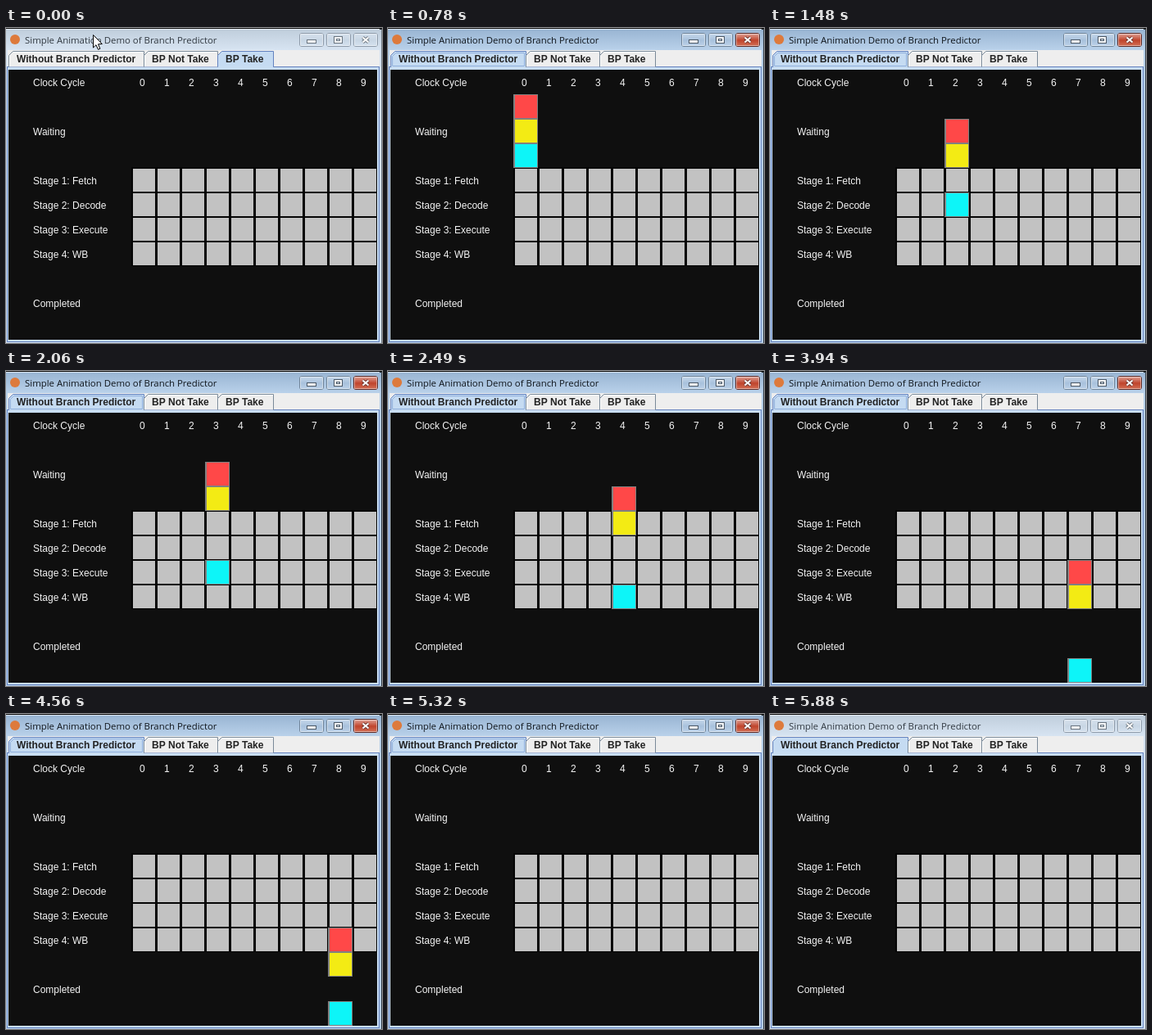
An HTML page with a canvas that plays this animation: 459 by 385 pixels, repeating every 5.98 s.

```html
<!DOCTYPE html>
<html lang="en">
<head>
<meta charset="utf-8">
<title>Branch Predictor Demo</title>
<style>
html, body { margin: 0; width: 100%; height: 100%; overflow: hidden; background: #000; }
canvas { display: block; }
</style>
</head>
<body>
<canvas id="stage" width="459" height="385"></canvas>
<script>
const ctx = document.getElementById('stage').getContext('2d');
const LOOP = 5980, CELL = 30, LEFT = 153, TOP = 81;
const SANS = '"Liberation Sans", Arial, sans-serif';

// Visible time span of each clock cycle, in ms
const CYCLES = [[510, 940], [1060, 1480], [1480, 1920], [2060, 2370], [2490, 2920],
  [3080, 3350], [3470, 3940], [3940, 4400], [4560, 4870], [5010, 5320]];
// Pointer: start time, x, y
const POINTER = [[0, 106, 8], [120, 104, 17], [240, 101, 27], [510, 99, 43], [660, 101, 43]];
const POINTER_END = 780;
const ACTIVE_FROM = 390, ACTIVE_TO = 5880;

const TABS = [['Without Branch Predictor', 3, 168], ['BP Not Take', 168, 258], ['BP Take', 258, 326]];
const LABELS = [['Clock Cycle', 71], ['Waiting', 131], ['Stage 1: Fetch', 191], ['Stage 2: Decode', 221],
  ['Stage 3: Execute', 251], ['Stage 4: WB', 281], ['Completed', 341]];

function rect(x, y, w, h, color) {
  ctx.fillStyle = color;
  ctx.fillRect(x, y, w, h);
}

function text(str, x, y, font, color) {
  ctx.font = font;
  ctx.fillStyle = color;
  ctx.fillText(str, x, y);
}

function fade(y0, y1, ...colors) {
  const g = ctx.createLinearGradient(0, y0, 0, y1);
  colors.forEach((c, i) => g.addColorStop(i / (colors.length - 1), c));
  return g;
}

function path(points, close) {
  ctx.beginPath();
  points.forEach(([x, y]) => ctx.lineTo(x, y));
  if (close) ctx.closePath();
}

function button(x, fill, edge) {
  ctx.beginPath();
  ctx.roundRect(x + 0.5, 6.5, 29, 16, 2.5);
  ctx.fillStyle = fill;
  ctx.fill();
  ctx.strokeStyle = edge;
  ctx.lineWidth = 1;
  ctx.stroke();
  ctx.strokeStyle = 'rgba(255,255,255,0.45)';
  ctx.strokeRect(x + 1.5, 7.5, 27, 14);
}

function cross(x, y, width, color) {
  ctx.beginPath();
  ctx.moveTo(x - 3.5, y - 3);
  ctx.lineTo(x + 3.5, y + 3);
  ctx.moveTo(x + 3.5, y - 3);
  ctx.lineTo(x - 3.5, y + 3);
  ctx.lineWidth = width;
  ctx.strokeStyle = color;
  ctx.stroke();
}

function titleBar(active) {
  const frame = active ? '#b9d1ea' : '#d7e4f2';
  rect(0, 0, 459, 385, frame);
  rect(0, 1, 459, 26, fade(1, 27, active ? '#98b4d2' : '#bfcddb', frame));
  rect(0, 0, 459, 1, '#101010');
  rect(0, 1, 457, 1, active ? '#dce8f4' : '#e8eff6');
  rect(458, 1, 1, 384, active ? '#3c4650' : '#7b858f');
  rect(456, 1, 3, 1, '#30363c');

  ctx.beginPath();
  ctx.arc(11, 14, 6, 0, Math.PI * 2);
  ctx.fillStyle = '#dd7a3c';
  ctx.fill();
  text('Simple Animation Demo of Branch Predictor', 23, 19,
    '11.4px "Open Sans", "Noto Sans", sans-serif', active ? '#10161c' : '#323a42');

  const face = active ? fade(7, 23, '#c5d7ea', '#a8c1dc', '#bed3ea')
    : fade(7, 23, '#d5e0ec', '#c8d6e4', '#d6e3f0');
  const edge = active ? '#6f8499' : '#8e9baa';
  const glyph = active ? '#4b5866' : '#69747f';
  button(358, face, edge);
  button(391, face, edge);
  button(424, active ? fade(7, 23, '#dfa296', '#c0442c', '#d4745a') : face, active ? '#5e2a26' : edge);

  rect(367, 14, 12, 5, glyph);
  rect(368, 15, 10, 3, '#f6f8fa');
  rect(400, 10, 11, 9, glyph);
  rect(401, 11, 9, 7, '#f6f8fa');
  rect(403, 13, 5, 3, glyph);
  rect(404, 14, 3, 1, '#dbe5ef');
  cross(439, 14.5, 4, active ? '#6b332d' : glyph);
  cross(439, 14.5, 2.2, '#fafafa');
}

function tab([name, x0, x1], on, focus) {
  const outline = [[x0 + 0.5, 47.5], [x0 + 0.5, 33.5], [x0 + 5.5, 28.5], [x1 + 0.5, 28.5], [x1 + 0.5, 47.5]];
  path(outline);
  ctx.fillStyle = on ? '#c5dbf2' : '#eeeeee';
  ctx.fill();
  ctx.strokeStyle = on ? '#6382bf' : '#7a8a99';
  ctx.lineWidth = 1;
  ctx.stroke();
  if (!on) {
    rect(x0 + 6, 29, x1 - x0 - 6, 1, '#ffffff');
    rect(x0 + 1, 34, 1, 13, '#ffffff');
  }
  if (focus) {
    path([[x0 + 2.5, 46.5], [x0 + 2.5, 34.5], [x0 + 6.5, 30.5], [x1 - 1.5, 30.5], [x1 - 1.5, 46.5]], true);
    ctx.strokeStyle = '#8faedb';
    ctx.stroke();
  }
  text(name, x0 + 10, 42, 'bold 12px ' + SANS, '#222222');
}

function tabPane(selected, active) {
  rect(2, 27, 454, 20, '#eeeeee');
  rect(1, 47, 455, 337, '#6382bf');
  rect(2, 48, 453, 335, '#c8ddf2');
  TABS.forEach((t, i) => tab(t, i === selected, active && i === selected));
  const [, x0, x1] = TABS[selected];
  rect(x0 + 1, 47, x1 - x0 - 1, 1, '#c8ddf2');
}

function board() {
  rect(3, 51, 450, 330, '#0f0f0f');
  LABELS.forEach(([s, y]) => text(s, 33, y, '12px ' + SANS, '#f4f4f4'));
  rect(LEFT, 170, 300, 121, '#050505');
  for (let c = 0; c < 10; c++) {
    text(String(c), 163 + c * CELL, 71, '12px ' + SANS, '#f4f4f4');
    for (let r = 0; r < 4; r++) rect(155 + c * CELL, 172 + r * CELL, 27, 28, '#c2c2c2');
  }
}

function block(col, slot, color) {
  const x = LEFT + col * CELL, y = TOP + slot * CELL;
  rect(x, y, CELL, CELL, '#808080');
  rect(x + 2, y + 1, 27, 28, color);
}

function blocks(t) {
  const c = CYCLES.findIndex(([a, b]) => t >= a && t < b);
  if (c < 0) return;
  // The second job is held back until the first one reaches write-back
  const second = c < 1 ? 1 : 2 + Math.max(0, c - 3);
  block(c, second - 1, '#ff4848');
  block(c, second, '#f3eb14');
  block(c, Math.min(9, c + 2), '#0df5f8');
}

function pointer(t) {
  if (t >= POINTER_END) return;
  const [, x, y] = POINTER.filter(p => p[0] <= t).pop();
  ctx.save();
  ctx.translate(x + 0.5, y + 0.5);
  path([[0, 0], [0, 15.5], [3.5, 12.2], [6, 17.8], [8.4, 16.8], [6, 11.3], [10.8, 11]], true);
  ctx.fillStyle = '#ffffff';
  ctx.fill();
  ctx.strokeStyle = '#000000';
  ctx.lineWidth = 1;
  ctx.stroke();
  ctx.restore();
}

function draw(t) {
  const active = t >= ACTIVE_FROM && t < ACTIVE_TO;
  titleBar(active);
  tabPane(t < ACTIVE_FROM ? 2 : 0, active);
  board();
  blocks(t);
  pointer(t);
}

const start = performance.now();
function tick() {
  draw((performance.now() - start) % LOOP);
  requestAnimationFrame(tick);
}
tick();
</script>
</body>
</html>
```
